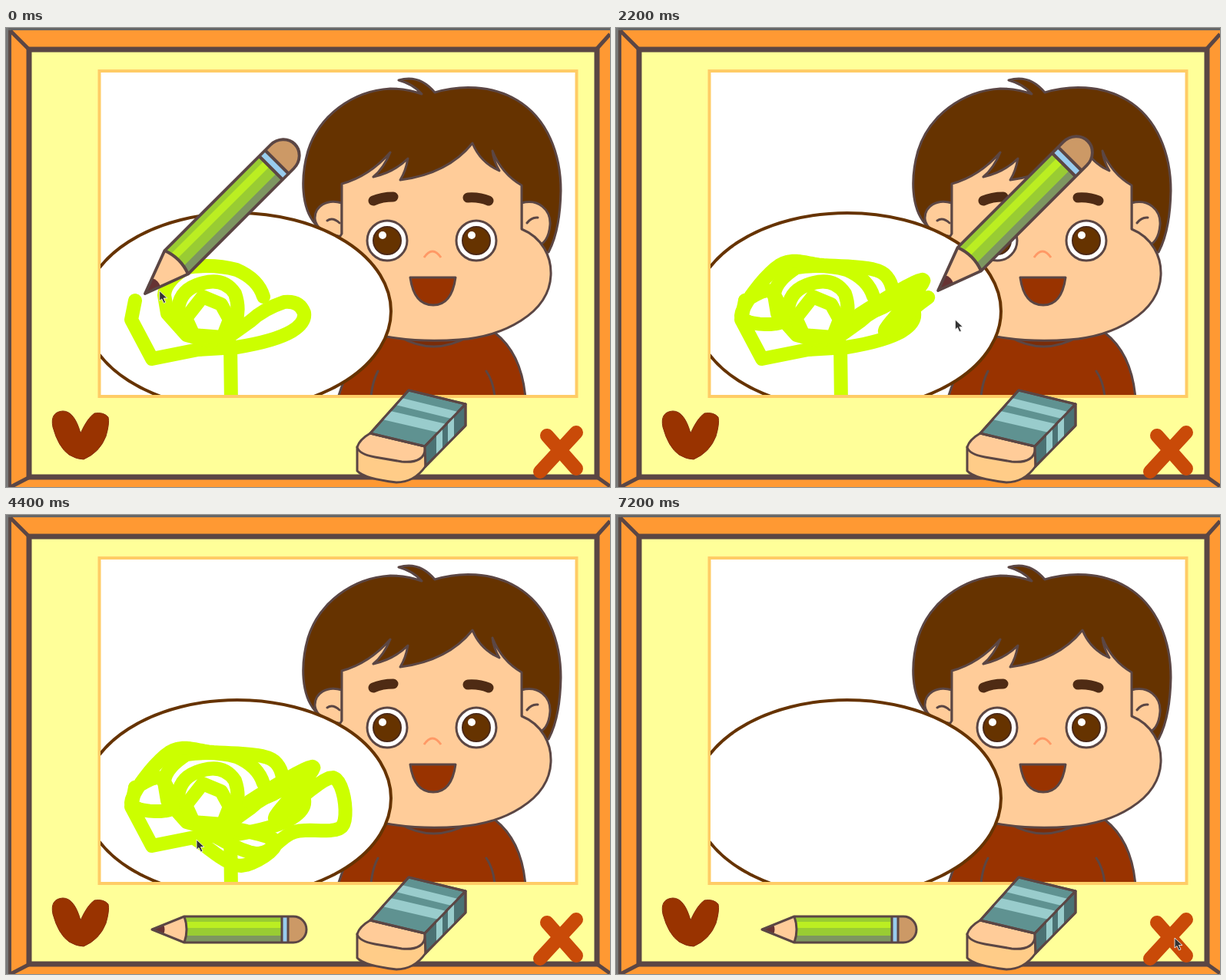
An HTML page for the animation above (7.3 s loop, 786x598 px).

```html
<!DOCTYPE html>
<html lang="en">
<head>
<meta charset="utf-8">
<title>Drawing game</title>
<style>
  html, body { margin: 0; width: 100%; height: 100%; overflow: hidden; background: #ff9; }
  svg { display: block; width: 786px; height: 598px; }
  .ink { stroke: #5b4644; stroke-width: 3; stroke-linejoin: round; stroke-linecap: round; }
  .line { fill: none; }
  .skin { fill: #fc9; }
  .hair { fill: #630; }
  .red { fill: #930; }
  .crayon { fill: none; stroke: #cf0; stroke-width: 18; stroke-linejoin: round; stroke-linecap: round; }
</style>
</head>
<body>
<svg viewBox="0 0 786 598">
  <defs>
    <clipPath id="panel"><rect x="123" y="57" width="618" height="421"/></clipPath>
    <g id="eye">
      <circle class="ink" r="26" fill="#fff"/>
      <circle r="18" fill="#630" stroke="#4d2a18" stroke-width="2"/>
      <circle cx="-6" cy="-7" r="5" fill="#fff"/>
    </g>
  </defs>

  <!-- frame -->
  <rect width="786" height="598" fill="#f93"/>
  <rect width="786" height="3" fill="#666"/>
  <rect width="3" height="598" fill="#777"/>
  <rect x="3" y="3" width="4" height="595" fill="#5b4a46"/>
  <path d="M6 4L30 28M786 8L768 28M6 598L31 585M769 585L786 597" stroke="#5b4644" stroke-width="5"/>
  <rect x="30" y="28" width="739" height="557" fill="#ff9" stroke="#5b4644" stroke-width="7"/>
  <rect x="121.5" y="56" width="621" height="424" fill="#fff" stroke="#fc6" stroke-width="4"/>

  <g clip-path="url(#panel)">
    <!-- boy -->
    <path class="ink red" d="M432 482Q455 405 505 401Q556 412 636 397Q671 424 676 482Z"/>
    <path class="ink" fill="#7a2c08" d="M512 402Q556 428 602 402Z"/>
    <path class="ink line" d="M484 447Q477 460 475 480M625 447Q634 460 636 480"/>
    <path class="ink hair" d="M403 256C384 235 383 195 393 160C407 115 450 82 500 79Q522 79 541 86Q530 73 511 68Q538 60 558 84C590 74 632 74 665 94C705 118 722 165 722 212Q721 264 706 292L600 300L437 280Z"/>
    <path class="ink skin" d="M437 228C418 222 401 232 402 249Q404 266 437 272Z"/>
    <path class="ink skin" d="M671 228C693 222 709 237 708 256Q706 281 690 284L671 270Z"/>
    <path class="ink line" d="M418 251Q425 246 434 254M678 254Q684 246 692 247"/>
    <path class="ink skin" d="M437 203Q473 193 500 162Q492 182 478 194Q505 188 523 170Q520 187 513 198Q575 190 607 150Q617 175 642 186Q634 172 633 160Q645 190 671 205V262C698 273 710 298 709 322C707 372 647 402 590 406Q540 410 495 402Q437 380 420 320Q425 285 437 268Z"/>
    <path d="M478 225Q489 220 504 220M601 221Q616 220 628 225" class="line" stroke="#4f2b14" stroke-width="13" stroke-linecap="round"/>
    <use href="#eye" x="496" y="277"/>
    <use href="#eye" x="612" y="277"/>
    <path class="line" d="M544 299Q555 283 566 299" stroke="#f96" stroke-width="3"/>
    <path class="ink red" d="M526 325H585Q580 361 556 361Q531 361 526 325Z"/>

    <!-- bubble and crayon -->
    <ellipse cx="301" cy="369" rx="200" ry="128" fill="#fff" stroke="#630" stroke-width="4"/>
    <g id="art" class="crayon">
      <path d="M293 490L292 412"/>
      <path d="M168 355L163 380L190 431L250 419L300 416Q350 408 372 395Q390 384 388 371Q382 355 362 357Q335 366 318 382L290 402"/>
      <path d="M335 350Q328 327 300 315Q270 307 235 312Q207 330 206 348L210 372L235 400L268 409"/>
      <path d="M234 378L256 350L280 360L291 380L282 403L244 400Z"/>
      <path d="M224 375Q222 345 248 335Q282 322 298 346Q308 375 290 402"/>
      <polyline id="trail"/>
    </g>
  </g>

  <!-- heart and cross -->
  <path class="red" stroke="#852c0c" d="M97 528Q89 499 74 499Q57 500 61 520Q68 546 82 556Q92 562 101 562Q122 553 130 532Q135 515 133 507Q127 500 115 502Q106 508 97 528Z"/>
  <path d="M704 531L742 574M742 527L695 578" stroke="#c94a08" stroke-width="18" stroke-linecap="round"/>

  <!-- eraser -->
  <g class="ink">
    <path fill="#fc8" d="M457 546V577Q466 587 508 592Q531 592 546 571V545Z"/>
    <path class="skin" d="M474 528L545 545C547 560 535 567 515 565L480 559Q459 555 457 546Q460 536 474 528Z"/>
    <path fill="#5f9291" d="M474 528L524 472L598 490L545 545Z"/>
    <path fill="#4b7274" d="M545 545L598 490V518L546 571Z"/>
    <g fill="#9cc" stroke="none">
      <path d="M490 510L500 499L573 516L563 527Z"/>
      <path d="M507 491L515 482L588 500L580 509Z"/>
      <path d="M560 530L568 522V548L560 556Z"/>
      <path d="M575 514L583 506V533L575 541Z"/>
    </g>
    <path class="line" d="M474 528L524 472L598 490L545 545ZM598 490V518L546 571"/>
  </g>

  <g id="pencil">
    <path fill="#9c3" d="M42-17H169V17H42Z"/>
    <path fill="#be2" d="M43-10H169V-2H43Z"/>
    <path fill="#7d9660" d="M42 8H169V17H42Z"/>
    <path fill="#9ce" d="M169-17H177V17H169Z"/>
    <path fill="#c96" d="M177-17H184A17 17 0 0 1 184 17H177Z"/>
    <path class="skin" d="M0 0L42-17Q48 0 42 17Z"/>
    <path fill="#633" d="M0 0L15-6Q18 0 15 6Z"/>
    <path class="ink line" d="M0 0L42-17H184A17 17 0 0 1 184 17H42ZM42-17Q48 0 42 17M169-17V17M177-17V17"/>
  </g>

  <path id="cursor" d="M0 0V13L3 10.500L5.500 16L8 15L5.500 9.500H10Z" fill="#333" stroke="#fff" stroke-width=".8"/>
</svg>
<script>
  const LOOP = 7300, STEP = 100, LEAD = 190;
  const SKETCH = 1400, LOBE = 2900, DROP = 3600;
  const HOME = 4400, LEAVE = 5200, ARRIVE = 6100, CLEAR = 6700;

  // Turning points of the scribble, one row per stroke.
  const keys = [
    [168, 355], [201, 343], [215, 383], [163, 375], [213, 309], [270, 309], [345, 318],
    [358, 356], [317, 373], [400, 328], [350, 395], [425, 342], [438, 405], [375, 413],
    [325, 441], [252, 403], [350, 424], [305, 457], [248, 423]
  ];
  const last = keys.length - 1;
  const rest = keys[last], cross = [727, 551];

  const [art, trail, pencil, cursor] =
    ['art', 'trail', 'pencil', 'cursor'].map(id => document.getElementById(id));

  const clamp = (v, lo, hi) => Math.min(hi, Math.max(lo, v));
  const part = (t, from, to) => clamp((t - from) / (to - from), 0, 1);
  const key = i => keys[clamp(i, 0, last)];

  // Smooth curve through the turning points, evenly timed within each stroke.
  function pen(t) {
    const u = 7 * part(t, 0, SKETCH) + 7 * part(t, SKETCH, LOBE) + 4 * part(t, LOBE, DROP);
    const i = Math.floor(u), f = u - i;
    return [0, 1].map(k => {
      const [a, b, c, d] = [-1, 0, 1, 2].map(o => key(i + o)[k]);
      return b + f / 2 * (c - a + f * (2 * a - 5 * b + 4 * c - d + f * (3 * (b - c) + d - a)));
    });
  }

  // The mouse leads the dragged pencil, then walks over to the cross.
  function mouse(t) {
    const p = part(t, LEAVE, ARRIVE), e = p * p * (3 - 2 * p);
    return pen(t + LEAD).map((v, i) => v + (cross[i] - v) * e);
  }

  const place = (el, x, y, extra = '') =>
    el.setAttribute('transform', `translate(${x} ${y}) ${extra}`);

  function draw(t) {
    const line = [];
    for (let s = 0; s <= Math.min(t, DROP); s += 20) line.push(pen(s));
    trail.setAttribute('points', line.join(' '));
    art.style.display = t < CLEAR ? '' : 'none';

    const [x, y] = pen(t);
    if (t < DROP) place(pencil, x + 13, y - 9, 'rotate(-45) scale(1.37 1.27)');
    else if (t < HOME) place(pencil, x - 102, y);
    else place(pencil, 190, 540);

    place(cursor, ...mouse(t));
  }

  const start = performance.now();
  function tick() {
    const t = (performance.now() - start) % LOOP;
    draw(Math.floor(t / STEP) * STEP);
    requestAnimationFrame(tick);
  }
  tick();
</script>
</body>
</html>
```
